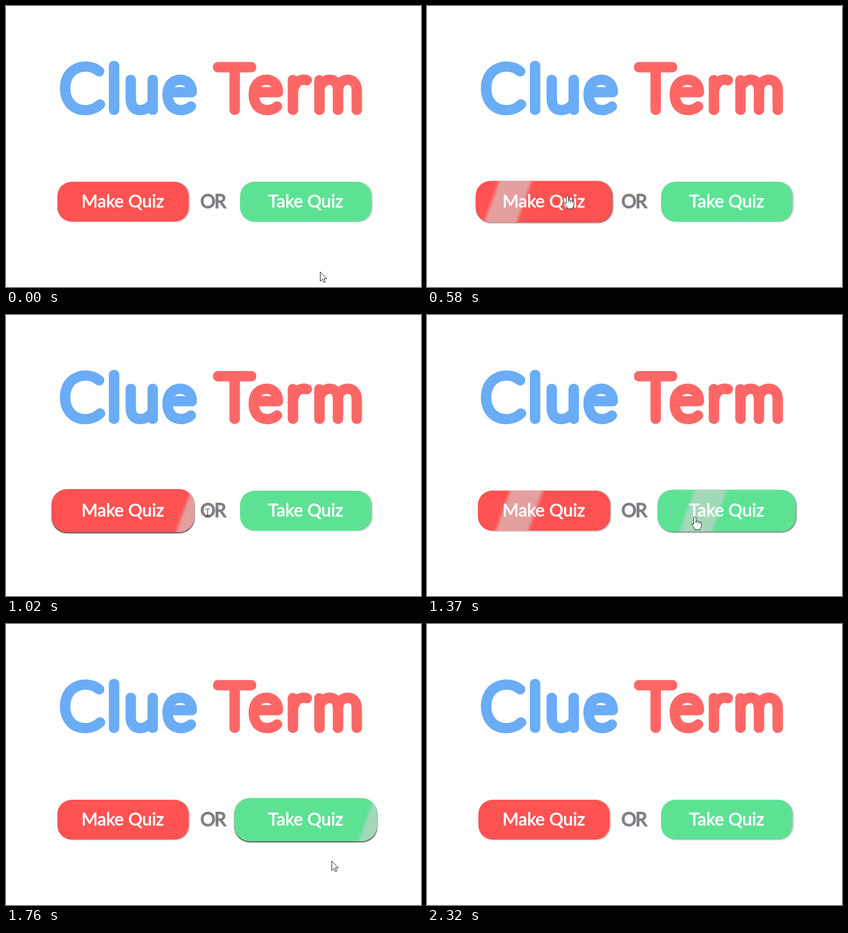
An HTML page that plays this animation: 727x494 px, repeating every 2.92 s.

```html
<!DOCTYPE html>
<html lang="en">
<head>
<meta charset="utf-8">
<title>Quiz menu</title>
<style>
  html, body { margin: 0; width: 100%; height: 100%; overflow: hidden; background: #fff; }
  svg { display: block; width: 727px; height: 494px; }
  text { font-family: Lato, "Open Sans", sans-serif; stroke-linejoin: round; }
  .title { font-size: 109px; font-weight: 100; stroke-width: 17px; stroke-linecap: round; }
  .label { font-size: 30.7px; fill: #fff; stroke: #fff; stroke-width: .9px; text-anchor: middle; }
  .or { font-size: 33px; fill: #7f8084; stroke: #7f8084; stroke-width: 1.8px; letter-spacing: -2px; }
  .pointer path { fill: #fff; stroke: #222; stroke-width: 1; stroke-linejoin: round; }
  .pointer .line { fill: none; }
</style>
</head>
<body>
<svg id="stage" viewBox="0 0 727 494">
  <defs>
    <filter id="soft" x="-10%" y="-20%" width="120%" height="140%"><feGaussianBlur stdDeviation="1"/></filter>
    <filter id="glow" x="-30%" y="-20%" width="160%" height="140%"><feGaussianBlur stdDeviation="2.4"/></filter>
  </defs>
  <rect width="727" height="494" fill="#fff"/>
  <text class="title" x="95.5" y="182.5" fill="#6aacf6" stroke="#6aacf6" letter-spacing="8">Clue</text>
  <text class="title" x="369.5" y="182.5" fill="#ff6767" stroke="#ff6767" letter-spacing="9">Term</text>
  <g id="buttons"></g>
  <text class="or" x="340.5" y="355">OR</text>
  <g class="pointer" id="pointer">
    <g id="arrow"><path d="M.5 .5V17L4.3 13.4L6.8 19L9.3 18L6.8 12.4H12Z"/></g>
    <g id="hand">
      <path d="M-2 2Q0-1.2 2 2V8.5Q4 6.6 5.4 9Q7.4 7.6 8.7 10Q11.5 9.4 11.5 12.4V16Q11.2 19 9.2 21.5V23.5H0V21.5Q-4 17-5.4 13.6Q-5.4 11-2 13.8Z"/>
      <path class="line" d="M2 8.5V12M5.4 9V12.5M8.7 10V13"/>
    </g>
    <g id="beam"><path class="line" d="M-4-7H-1L0-6L1-7H4M0-6V6M-4 7H-1L0 6L1 7H4"/></g>
  </g>
</svg>
<script>
const LOOP = 2920, FADE = 500;
const NS = 'http://www.w3.org/2000/svg';
const byId = id => document.getElementById(id);
const mix = (a, b, k) => a + (b - a) * k;
const clamp = v => Math.min(1, Math.max(0, v));

function add(parent, tag, attrs) {
  const el = document.createElementNS(NS, tag);
  set(el, attrs);
  return parent.appendChild(el);
}
function set(el, attrs) {
  for (const key in attrs) el.setAttribute(key, attrs[key]);
}

// cubic-bezier(.25, .1, .25, 1)
function ease(x) {
  const curve = (s, p, q) => 3 * (1 - s) * (1 - s) * s * p + 3 * (1 - s) * s * s * q + s * s * s;
  let lo = 0, hi = 1;
  for (let i = 0; i < 24; i++) {
    const mid = (lo + hi) / 2;
    if (curve(mid, .25, .25) < x) lo = mid; else hi = mid;
  }
  return curve(lo, .1, 1);
}

function makeButton(id, cx, labelX, label, color, enter, leave) {
  const clip = add(add(byId('stage').querySelector('defs'), 'clipPath', { id }), 'rect', {});
  const g = add(byId('buttons'), 'g', {});
  const shadow = add(g, 'rect', { filter: 'url(#soft)' });
  const face = add(g, 'rect', { fill: color });
  const shineBox = add(g, 'g', { 'clip-path': `url(#${id})` });
  const shine = add(shineBox, 'g', {});
  add(shine, 'path', { d: 'M-12 -46H45L12 46H-45Z', fill: '#d2d2d2', 'fill-opacity': .6, filter: 'url(#glow)' });
  add(g, 'text', { class: 'label', x: labelX, y: 354 }).textContent = label;

  return t => {
    const leaving = t >= leave;
    const raw = clamp((t - (leaving ? leave : enter)) / FADE);
    const k = leaving ? 1 - ease(raw) : ease(raw);
    const w = mix(230, 250, k), h = mix(70, 76, k);
    const box = { x: cx - w / 2, y: 344 - h / 2, width: w, height: h, rx: mix(25, 27, k) };
    set(face, box);
    set(clip, box);
    set(shadow, { ...box, x: box.x + mix(2, .2, k), y: box.y + mix(.8, 1.6, k), opacity: mix(.26, .85, k) });
    const pass = leaving ? 1 - raw : raw;
    set(shine, { transform: `translate(${cx + mix(-141, 135, pass)} 344)` });
    shineBox.style.display = pass > 0 ? '' : 'none';
  };
}

const buttons = [
  makeButton('clipMake', 205, 204.5, 'Make Quiz', '#ff5252', 440, 1048),
  makeButton('clipTake', 525, 525, 'Take Quiz', '#5de294', 1190, 1800)
];

// time, x, y of the pointer's hot spot
const path = [
  [20, 550, 467], [440, 319, 362], [580, 246, 333], [680, 246, 334],
  [1020, 353, 348], [1185, 411, 351], [1370, 469, 354],
  [1760, 570, 416], [2050, 624, 486], [2150, 642, 508]
];

function pointerAt(t) {
  if (t <= path[0][0]) return path[0].slice(1);
  const i = path.findIndex(p => p[0] > t);
  const [t0, x0, y0] = path[i - 1], [t1, x1, y1] = path[i];
  const k = (t - t0) / (t1 - t0);
  return [mix(x0, x1, k), mix(y0, y1, k)];
}

function drawPointer(t) {
  const shown = t < 2150;
  byId('pointer').style.display = shown ? '' : 'none';
  if (!shown) return;
  const [x, y] = pointerAt(t);
  const inRow = y > 306 && y < 382;
  let kind = 'arrow';
  if (inRow && (x < 325 || x > 405)) kind = 'hand';
  else if (inRow && x > 340 && x < 387) kind = 'beam';
  for (const id of ['arrow', 'hand', 'beam']) byId(id).style.display = id === kind ? '' : 'none';
  byId('arrow').firstElementChild.style.stroke = t > 2000 ? '#22c32e' : '';
  set(byId('pointer'), { transform: `translate(${x} ${y})` });
}

function render(t) {
  buttons.forEach(draw => draw(t));
  drawPointer(t);
}

const start = performance.now();
function tick() {
  render((performance.now() - start) % LOOP);
  requestAnimationFrame(tick);
}
tick();
</script>
</body>
</html>
```
